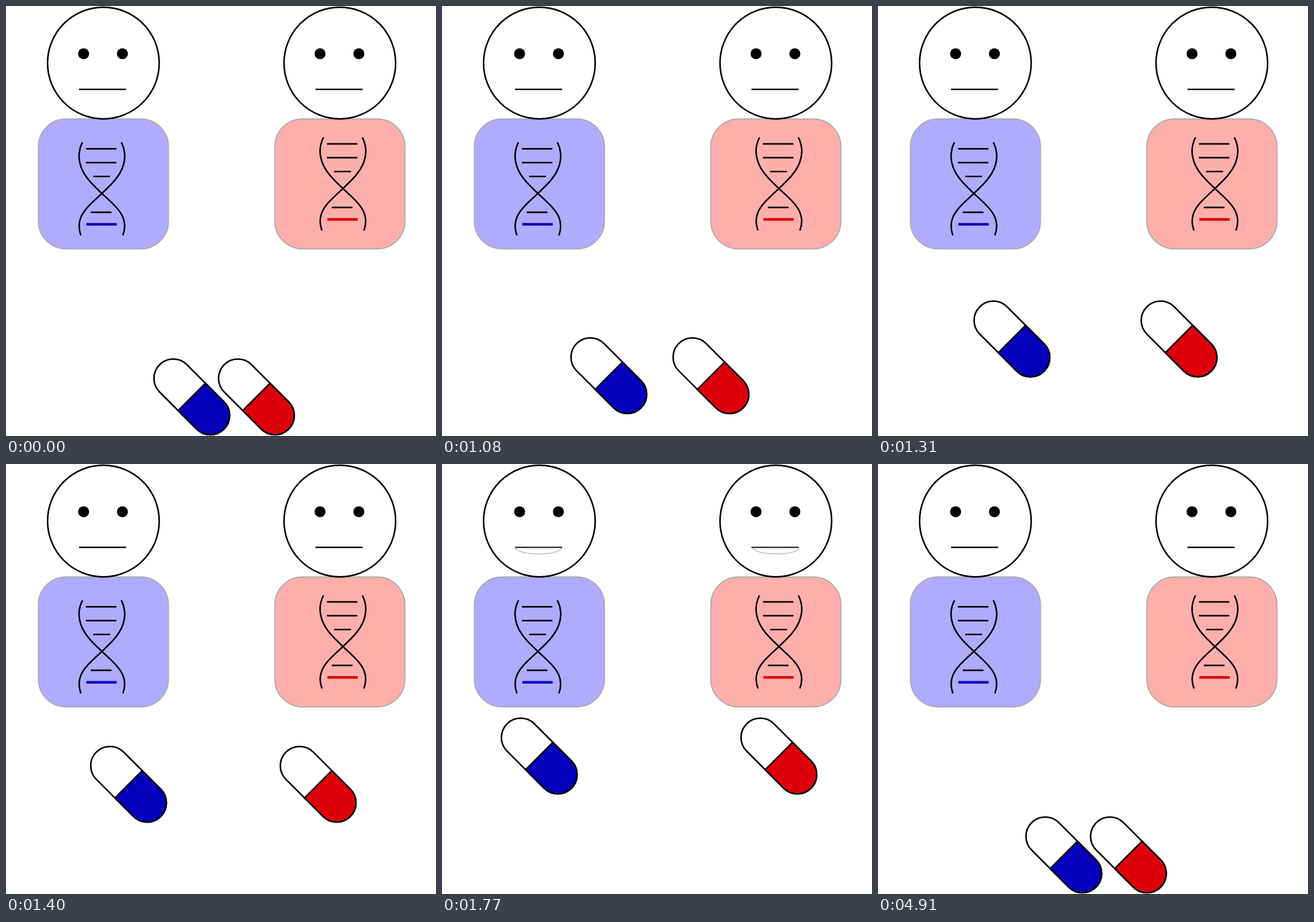
Recreate the animation shown at these times as an HTML page. Size 748 px wide and 748 px high, loop 5.07 s.

```html
<!DOCTYPE html>
<html lang="en">
<head>
<meta charset="utf-8">
<title>Two patients, two pills</title>
<style>
  html, body { margin: 0; width: 100%; height: 100%; overflow: hidden; background: #fff; }
  svg { display: block; width: 100%; height: 100%; }
  .ink { fill: none; stroke: #000; stroke-width: 2.7; }
  .gene { stroke-width: 4.6; }
  .body { stroke: #aaa; stroke-width: 1.9; }
</style>
</head>
<body>
<svg viewBox="0 0 748 748">
  <defs>
    <g id="head">
      <circle class="ink" cx="169.4" cy="99.2" r="97.1"/>
      <circle cx="135" cy="83" r="9.6"/>
      <circle cx="202.5" cy="83" r="9.6"/>
    </g>
    <rect id="torso" class="body" x="56.3" y="196.5" width="226.3" height="226" rx="48"/>
    <path id="strand" d="M133 237C126.5 250 125 265 130.5 280C137 298 151 311 166.8 326C184 342 198 354 203.5 368C208 379 207 389 203.3 399"/>
    <g id="dna" class="ink">
      <use href="#strand"/>
      <use href="#strand" transform="matrix(-1 0 0 1 333.6 0)"/>
      <path d="M139 248.3H192M139 272.3H192M151.5 296.5H181M147.5 358.8H183.5"/>
    </g>
    <path id="gene" class="gene" d="M139.7 379.7H192.5"/>
    <path id="line" class="ink" d="M127 145H209"/>
    <path id="curve" class="ink" style="stroke-width:2.1" d="M127 145.5C133 160 203 160 209 145.5"/>
    <rect id="shell" x="-79.2" y="-33.6" width="158.4" height="67.2" rx="33.6"/>
    <path id="half" d="M0 -33.6H45.6A33.6 33.6 0 0 1 45.6 33.6H0Z"/>
  </defs>

  <use href="#torso" fill="#afabff"/>
  <use href="#head"/>
  <use href="#dna"/>
  <use href="#gene" stroke="#0500bc"/>

  <g transform="translate(411.3 0)">
    <use href="#torso" fill="#ffafab"/>
    <use href="#head"/>
  </g>
  <g transform="translate(419.3 -8.5)">
    <use href="#dna"/>
    <use href="#gene" stroke="#dd000a"/>
  </g>

  <g id="neutral">
    <use href="#line"/>
    <use href="#line" x="411.3"/>
  </g>
  <g id="smile" opacity="0">
    <use href="#curve"/>
    <use href="#curve" x="413.4"/>
  </g>

  <g id="blue" transform="translate(323.2 680)">
    <g class="ink" transform="rotate(45)">
      <use href="#shell" fill="#fff"/>
      <use href="#half" fill="#0500bc"/>
    </g>
  </g>
  <g id="red" transform="translate(435.6 680)">
    <g class="ink" transform="rotate(45)">
      <use href="#shell" fill="#fff"/>
      <use href="#half" fill="#dd000a"/>
    </g>
  </g>
</svg>
<script>
const LOOP = 5070, RESET = 4910;
// The motion is shown in held steps at these times (ms).
const TICKS = [
  0, 920, 970, 1010, 1050, 1090, 1120, 1160, 1200, 1230, 1270, 1310, 1360, 1400, 1430,
  1480, 1520, 1550, 1600, 1710, 1750, 1790, 1830, 1870, 1910, 1950, 1990
];
const el = id => document.getElementById(id);
const [blue, red, neutral, smile] = ['blue', 'red', 'neutral', 'smile'].map(el);
const progress = (t, from, to) => Math.min(1, Math.max(0, (t - from) / (to - from)));

function place(pill, x, y) {
  pill.setAttribute('transform', `translate(${x} ${y})`);
}

function draw(time) {
  const t = time >= RESET ? 0 : TICKS.findLast(tick => tick <= time);
  const move = progress(t, 900, 1600);
  const mood = progress(t, 1690, 1990);
  place(blue, 323.2 - 154 * move, 680 - 172 * move);
  place(red, 435.6 + 150.4 * move, 680 - 172 * move);
  neutral.setAttribute('opacity', 1 - mood);
  smile.setAttribute('opacity', mood);
}

const start = performance.now();
function loop() {
  draw((performance.now() - start) % LOOP);
  requestAnimationFrame(loop);
}
loop();
</script>
</body>
</html>
```
